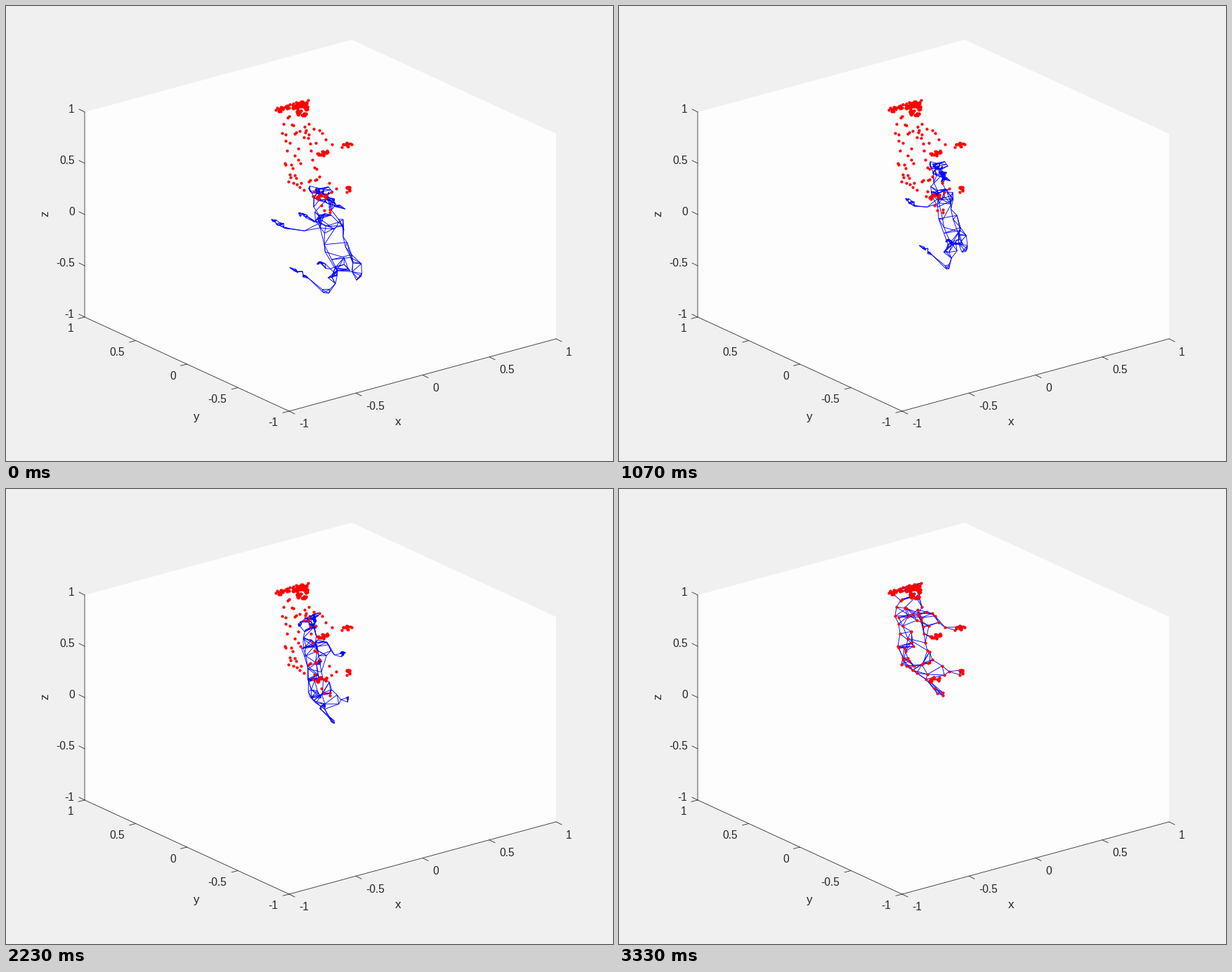
A matplotlib script for the animation above (4.83 s loop, 864x648 px).

```python
import numpy as np
import matplotlib.pyplot as plt
from matplotlib.animation import FuncAnimation
from matplotlib.collections import LineCollection

plt.rcParams["font.family"] = "Liberation Sans"

# Screen vectors, in pixels, of the three data axes
ORIGIN = np.array([447.5, 312.5])
AX = np.array([190.0, -51.5])
AY = np.array([-145.5, -67.0])
AZ = np.array([0.0, -146.0])
INK = "#262626"

STEPS, STEP_MS = 100, 100 / 3
INTERVAL, FRAMES = 30, 161

# The mesh is mirrored through a tilted plane while it drifts upwards
TILT = np.radians(12)
NORMAL = AY * np.cos(TILT) - AZ * np.sin(TILT)
MIRROR_AT = -0.157
DRIFT = np.array([-18.0, 112.0])
BULGE = 0.084


def project(x, y, z):
    return ORIGIN + x * AX + y * AY + z * AZ


rng = np.random.default_rng(7)


def cluster(count, centre, radii, side, depth=0.015, slope=0.0):
    """Random vertices in an ellipse; columns are screen x, screen y, data x."""
    angle = rng.uniform(0, 2 * np.pi, count)
    radius = np.sqrt(rng.uniform(0.05, 1, count))
    dx = radii[0] * radius * np.cos(angle)
    dy = radii[1] * radius * np.sin(angle) + slope * dx
    x = side + rng.uniform(-depth, depth, count)
    return np.column_stack([centre[0] + dx, centre[1] + dy, x])


def strip(side, *points):
    return np.array([(px, py, side) for px, py in points], float)


back = strip(0, (401, 159), (403, 157), (395, 168), (393, 181), (398, 192),
             (400, 206), (397, 224), (398, 226), (404, 240), (402, 250))
near_flank = strip(-0.05, (407, 169), (398, 183), (411, 182), (404, 195),
                   (411, 213), (408, 231), (405, 244), (409, 252),
                   (414, 254), (418, 258), (424, 262), (434, 206))
far_flank = strip(0.05, (409, 170), (425, 172), (413, 180), (418, 178),
                  (424, 187), (416, 203), (416, 219), (419, 224),
                  (406, 226), (411, 241), (413, 245), (420, 252))
belly = strip(0.01, (431, 168), (426, 180), (427, 177), (431, 183),
              (430, 188), (433, 196), (436, 219), (439, 230),
              (431, 250), (433, 248))
fore_leg = strip(0.08, (438, 175), (446, 177), (450, 181), (441, 195),
                 (455, 190), (464, 197))
hind_leg = strip(0.08, (442, 232), (446, 243), (442, 247), (440, 248),
                 (460, 252), (470, 260), (463, 265))
tail = strip(0, (439, 264), (437, 271), (449, 284), (453, 291),
             (461, 290), (461, 294))
ears = strip(0.09, (430, 134), (428, 137), (425, 138))

vertices = np.vstack([
    back, near_flank, far_flank, belly, fore_leg, hind_leg, tail, ears,
    cluster(14, (390, 147), (7, 3.5), 0),
    cluster(13, (404, 144), (8, 4), 0.01),
    cluster(52, (421, 146), (9.5, 11), 0.03, 0.025),
    cluster(18, (417, 140), (9, 4), 0.03, 0.02),
    cluster(14, (484, 198), (9, 3.5), 0.09, slope=-0.15),
    cluster(18, (451, 209), (9, 4), -0.09, slope=-0.1),
    cluster(11, (487, 261), (6, 3.5), 0.09, slope=-0.2),
    cluster(18, (449, 272), (8, 5), -0.09, slope=-0.2),
])
goal = vertices[:, :2]
xs = vertices[:, 2]
ys = (goal[:, 0] - ORIGIN[0] - AX[0] * xs) / AY[0]
zs = (goal[:, 1] - ORIGIN[1] - AX[1] * xs - AY[1] * ys) / AZ[1]
offset = ys * np.cos(TILT) - zs * np.sin(TILT) - MIRROR_AT


def nearest_edges(points, neighbours=4, reach=0.2):
    dist = np.linalg.norm(points[:, None] - points[None], axis=2)
    order = np.argsort(dist, axis=1)[:, 1:neighbours + 1]
    pairs = {tuple(sorted((i, int(j)))) for i, row in enumerate(order)
             for j in row if dist[i, j] < reach}
    return np.array(sorted(pairs))


edges = nearest_edges(np.column_stack([xs, ys, zs]))


def pose(step):
    t = step / STEPS
    along = offset * (-np.cos(np.pi * t) - 1) - BULGE * np.sin(np.pi * t)
    return goal + (1 - t) * DRIFT + along[:, None] * NORMAL


fig = plt.figure(figsize=(12, 9), dpi=72, facecolor="#f0f0f0")
ax = fig.add_axes([0, 0, 1, 1])
ax.set(xlim=(0, 864), ylim=(648, 0))
ax.axis("off")


def line(*points):
    ax.plot(*np.transpose(points), color=INK, lw=0.8, zorder=2)


def label(pos, text, align, size=15.5, **kw):
    ax.text(*pos, text, color=INK, size=size, ha=align,
            va="center_baseline", **kw)


box = [(-1, 1, 1), (1, 1, 1), (1, -1, 1), (1, -1, -1), (-1, -1, -1), (-1, 1, -1)]
ax.fill(*np.transpose([project(*c) for c in box]), color="#fdfdfe", lw=0, zorder=1)
line(project(-1, 1, 1), project(-1, 1, -1), project(-1, -1, -1),
     project(1, -1, -1))

for v in (-1, -0.5, 0, 0.5, 1):
    text = f"{v:g}"
    for pos, tick, shift, align in (
            (project(v, -1, -1), (8, 4), (14, 17.5), "left"),
            (project(-1, v, -1), (-9, 2.3), (-16, 15.5), "right"),
            (project(-1, 1, v), (-8, -4), (-14.5, -5), "right")):
        line(pos, pos + tick)
        label(pos + shift, text, align)

label((558, 591), "x", "center", 17)
label((270, 584), "y", "center", 17)
label((56, 297), "z", "center", 17, rotation=90)

mesh = LineCollection([], colors="#0000ff", linewidths=0.9, zorder=3)
ax.add_collection(mesh)
ax.plot(*goal.T, "o", color="#ff0000", ms=4.2, mew=0, zorder=4)


def update(i):
    step = min(STEPS, int((i * INTERVAL + 25) / STEP_MS))
    mesh.set_segments(pose(step)[edges])
    return [mesh]


anim = FuncAnimation(fig, update, frames=FRAMES, interval=INTERVAL,
                     repeat=True, repeat_delay=0)
plt.show()
```
